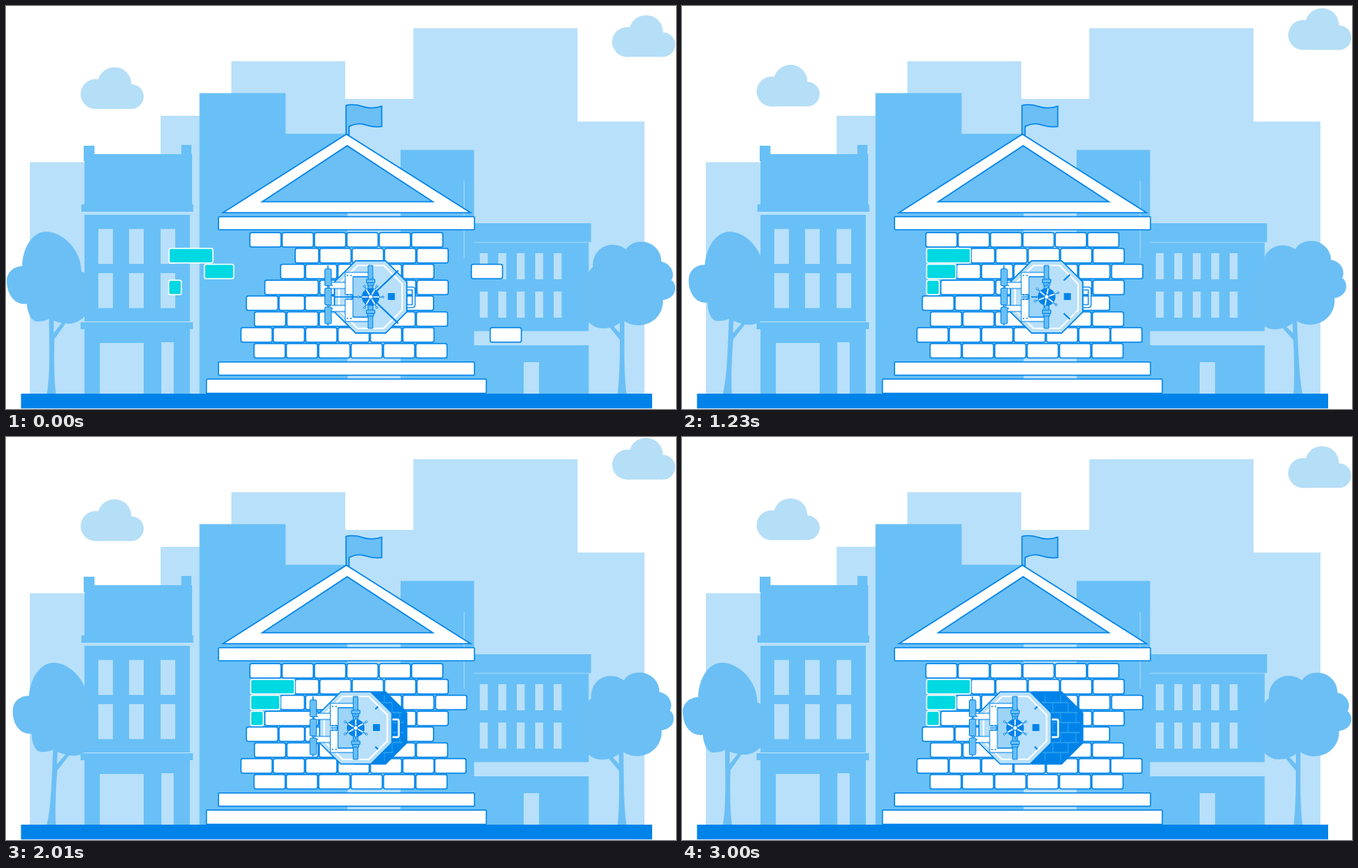
An HTML page with a canvas that plays this animation: 871 by 525 pixels, repeating every 3.03 s.

```html
<!DOCTYPE html>
<html lang="en">
<head>
<meta charset="utf-8">
<title>Bank building</title>
<style>
html, body { margin: 0; width: 100%; height: 100%; overflow: hidden; background: #fff; }
canvas { display: block; }
</style>
</head>
<body>
<canvas id="stage" width="871" height="525"></canvas>
<script>
const c = document.getElementById('stage').getContext('2d');
const LOOP = 3030;
const WHITE = '#fff', LIGHT = '#b8e0fa', MID = '#69c0f6', DARK = '#0083e9',
      CYAN = '#00d8e2', CLOUD = '#b5def7', LEAF = '#6bbff5', PANEL = '#9dd4f8';

// Periodic smooth curve through [time, value] keys; the first key is at 0.
function track(keys, t) {
  const n = keys.length;
  const key = i => {
    const wrap = Math.floor(i / n), k = keys[i - wrap * n];
    return [k[0] + wrap * LOOP, k[1]];
  };
  let i = n - 1;
  while (keys[i][0] > t) i--;
  const [a, b, d, e] = [key(i - 1), key(i), key(i + 1), key(i + 2)];
  const h = d[0] - b[0], u = (t - b[0]) / h;
  const m0 = (d[1] - a[1]) / (d[0] - a[0]) * h;
  const m1 = (e[1] - b[1]) / (e[0] - b[0]) * h;
  return b[1] + u * (m0 + u * (3 * (d[1] - b[1]) - 2 * m0 - m1 + u * (2 * (b[1] - d[1]) + m0 + m1)));
}

// Eased progress from 0 to 1 between two times.
function ease(t, from, to) {
  const u = Math.min(1, Math.max(0, (t - from) / (to - from)));
  return (1 - Math.cos(Math.PI * u)) / 2;
}

function paint(shape, fill, line, width = 1.5) {
  const p = typeof shape === 'string' ? new Path2D(shape) : shape;
  if (fill) { c.fillStyle = fill; c.fill(p); }
  if (line) { c.strokeStyle = line; c.lineWidth = width; c.stroke(p); }
}

function box(x, y, w, h, fill, line, r = 0, width) {
  const p = new Path2D();
  p.roundRect(x, y, w, h, r);
  paint(p, fill, line, width);
}

function dot(x, y, r, fill, line, width) {
  const p = new Path2D();
  p.arc(x, y, r, 0, 7);
  paint(p, fill, line, width);
}

function octagon(x, y, r) {
  const p = new Path2D();
  for (let i = 0; i < 8; i++) {
    const a = (i + .5) * Math.PI / 4, R = r / Math.cos(Math.PI / 8);
    p.lineTo(x + R * Math.cos(a), y + R * Math.sin(a));
  }
  p.closePath();
  return p;
}

function cloud(x, y) {
  c.save();
  c.translate(x, y);
  dot(19.5, 35, 19.5, CLOUD);
  dot(44, 22, 22, CLOUD);
  dot(66, 38.3, 16, CLOUD);
  box(19.5, 28, 46.5, 26.4, CLOUD);
  c.restore();
}

function city() {
  paint('M31 505V203.5H201V143H293V72H441V121H529.5V29H743V150.5H830V505Z', LIGHT);
  paint('M251.5 505V113.5H363.5V166.5H444V505Z', MID);
  box(513, 187.5, 95.5, 317.5, MID);
  box(595.3, 228, .8, 100, LIGHT);

  // left house
  box(102, 193, 140, 67, MID);
  box(101, 182, 14, 20, MID);
  box(228, 181, 13, 20, MID);
  box(98, 258.5, 145.5, 9.5, MID);
  box(102, 272, 137, 139, MID);
  box(97, 412, 146, 9, MID);
  box(102, 421, 137, 84, MID);
  for (const x of [120, 160, 201]) {
    box(x, 290.5, 19, 45.5, LIGHT);
    box(x, 348, 19, 45.5, LIGHT);
  }
  box(122, 439, 57, 66, LIGHT);
  box(202, 438, 16, 67, LIGHT);

  // right house
  box(608, 283, 152.5, 25, MID);
  box(608, 308, 149.5, 115.5, MID);
  box(608, 307.6, 152, .6, LIGHT);
  box(608, 442, 149.5, 63, MID);
  for (let x = 616; x < 720; x += 24) {
    box(x, 322, 10.3, 34, LIGHT);
    box(x, 372, 10.3, 34, LIGHT);
  }
  box(673, 464, 20, 41, LIGHT);
}

function tree(x, y, degrees, trunk, crown) {
  c.save();
  c.translate(x, y);
  c.rotate(degrees * Math.PI / 180);
  c.translate(-x, -y);
  paint(trunk, LEAF);
  paint(crown, LEAF);
  c.restore();
}

function trees(t) {
  tree(59, 506,
    track([[0, 0], [480, .8], [870, 2], [1590, 3.6], [2010, 3], [2490, .4]], t),
    'M53 506C58 480 56 440 56 400H62V426L74 411L77 414L63 434C62 460 63 490 65 506Z',
    'M1 358C1 347 10 339 21 339C22 312 36 294 52 294C74 294 98 318 98 346C108 348 113 362 113 378' +
    'C113 400 95 414 82 414C74 414 62 411 57 407C52 410 46 411 40 411C33 411 28 400 27 388C10 390 1 374 1 358Z');
  tree(801, 507,
    track([[0, 0], [480, -1.1], [870, -2.6], [1080, -2.8], [1590, -2], [2010, -.8], [2490, 0]], t),
    'M795 507C798 480 798 455 798 435L782 415L785 412L798 426V400H804C804 440 803 480 807 507Z',
    'M763 340C762 322 775 311 788 311C796 311 802 314 806 317C810 310 818 307 826 307C840 307 852 318 852 333' +
    'C862 335 867 343 867 350Q867 355 865 357C869 360 870 364 870 368C870 377 862 382 854 383' +
    'C855 402 840 416 822 416C814 416 807 413 802 409C796 416 786 420 776 420C762 420 750 408 750 392C748 376 752 348 763 340Z');
}

const brick = (x, row, w = 40.5, fill = WHITE, line = DARK) =>
  box(x, 295.2 + row * 20.65, w, 18.8, fill, line, 2.5);

// [row, first x, first width, x of the next brick, how many follow]
const WALL = [
  [0, 317, 40.5, 359, 5], [1, 376, 30.5, 408, 4], [2, 357, 31, 389.5, 4], [3, 336.5, 69.5, 408, 4],
  [4, 312.5, 41, 389, 4], [5, 323, 40.5, 365.2, 5], [6, 305.5, 40.5, 347.5, 5], [7, 322.5, 40.5, 364.5, 5]
];

// [row, start x, end x, width, start time, end time]
const LOOSE = [
  [1, 212, 318, 57, 170, 860], [2, 258, 318, 38, 0, 810], [3, 211.5, 318, 16.5, 0, 860],
  [2, 605, 558.5, 40.5, 0, 860], [6, 629.5, 557.5, 40.5, 170, 860]
];

function bank(t) {
  paint('M442 129.5C450 127.5 456 128.5 464 131C473 134 481 133 488.5 130.5V157C480 158.5 474 157 466 154.5' +
    'C458 152 452 154 446 157V168H442Z', LEAF, DARK);
  paint('M442.5 167L604 269.3H282Z', WHITE, DARK);
  paint('M443.5 182L555 255H333Z', LEAF, DARK);
  box(276.3, 274.5, 332.7, 17, WHITE, DARK, 1);
  box(276.3, 463.7, 332.7, 17.3, WHITE, DARK, 1);
  box(260.6, 486, 363.8, 18.5, WHITE, DARK, 1);

  for (const [row, x, w, next, count] of WALL) {
    brick(x, row, w);
    for (let i = 0; i < count; i++) brick(next + i * 42.1, row);
  }
  brick(355, 4, 33);
  for (const [row, from, to, w, start, end] of LOOSE) {
    const x = from + (to - from) * ease(t, start, end);
    if (from < to) brick(x, row, w, CYAN, WHITE);
    else brick(x, row, w);
  }
}

function opening() {
  c.save();
  paint(octagon(474, 379, 47), DARK, DARK);
  c.clip(octagon(474, 379, 43));
  const p = new Path2D();
  for (let row = 0; row < 8; row++) {
    const y = 333 + row * 13;
    p.rect(420, y, 110, 13);
    for (let x = 432 + row % 2 * 10; x < 525; x += 20) {
      p.moveTo(x, y);
      p.lineTo(x, y + 13);
    }
  }
  paint(p, null, '#2aa3f1', 1);
  c.restore();
}

function wheel(angle) {
  c.save();
  c.translate(474, 379);
  c.rotate(angle);
  for (let i = 0; i < 6; i++) {
    paint('M0 0H15', null, DARK, 1);
    dot(16, 0, 1.3, LIGHT, DARK, .8);
    c.rotate(Math.PI / 3);
  }
  dot(0, 0, 11.5, DARK);
  for (let i = 0; i < 6; i++) {
    paint('M3 0H11', null, WHITE, 1.6);
    c.rotate(Math.PI / 3);
  }
  dot(0, 0, 3, WHITE, DARK, 1);
  c.restore();
}

function door(t) {
  const unlock = ease(t, 550, 1500);
  c.save();
  c.translate(-41 * ease(t, 1620, 2430), 0);

  const handle = 'M521 368H528Q530 368 530 370V389Q530 391 528 391H521';
  paint(handle, null, DARK, 5);
  paint(handle, null, WHITE, 2.4);

  paint(octagon(474, 379, 47), LIGHT, DARK);
  paint(octagon(474, 379, 41), null, WHITE, 2);
  box(450, 353, 27, 52, PANEL, DARK, 0, .8);

  // hinge and its bracket
  for (const y of [360, 390]) box(420, y, 22, 8, WHITE, DARK, 2, 1);
  paint('M441 347H474V352.5H451V405.5H474V411H441V382H451V376H441Z', WHITE, DARK, 1);
  paint('M441 379H451', null, DARK, 1);
  for (const y of [351, 376, 382, 407]) {
    dot(444, y, .9, DARK);
    dot(448.5, y, .9, DARK);
  }
  for (const y of [364, 394]) dot(424, y, .9, DARK);
  paint('M418.5 338V416', null, DARK, 1.5);
  for (const y of [342.5, 367.5, 392]) box(414.5, y, 8.5, 22, MID, DARK, 1.5, 1);

  // vertical bolt
  box(470.8, 338, 6, 82, MID, DARK, 0, 1);
  for (const y of [356, 396]) {
    box(468.5, y, 11, 4.5, MID, DARK, 0, 1);
    box(470, y + 4.5, 8, 3.5, MID, DARK, 0, 1);
  }

  // locking rods shrink to short tips
  const near = 482 + 17.5 * unlock, far = 510 - 7 * unlock;
  for (const s of [-1, 1]) {
    const y = x => 379 + s * (x - 474) * .96;
    paint(`M${near} ${y(near)}L${far} ${y(far)}`, null, DARK, 2);
  }
  if (unlock < 1) paint(`M${427 + 33 * unlock} 379H462`, null, DARK, 1.6);

  wheel(unlock * Math.PI * 1.5);
  box(496.5, 374, 9, 9, DARK);
  c.restore();
}

function frame() {
  const t = performance.now() % LOOP;
  c.fillStyle = WHITE;
  c.fillRect(0, 0, 871, 525);
  city();
  cloud(97, track([[0, 79.7], [480, 76.7], [900, 75.5], [1590, 78.2], [2010, 81.1], [2460, 83.6]], t));
  cloud(788, .2 + 11.7 * (1 - ease(t, 0, 1800) + ease(t, 1800, LOOP)));
  trees(t);
  bank(t);
  opening();
  door(t);
  box(19.5, 505, 820.5, 19.3, DARK);
  requestAnimationFrame(frame);
}
requestAnimationFrame(frame);
</script>
</body>
</html>
```
